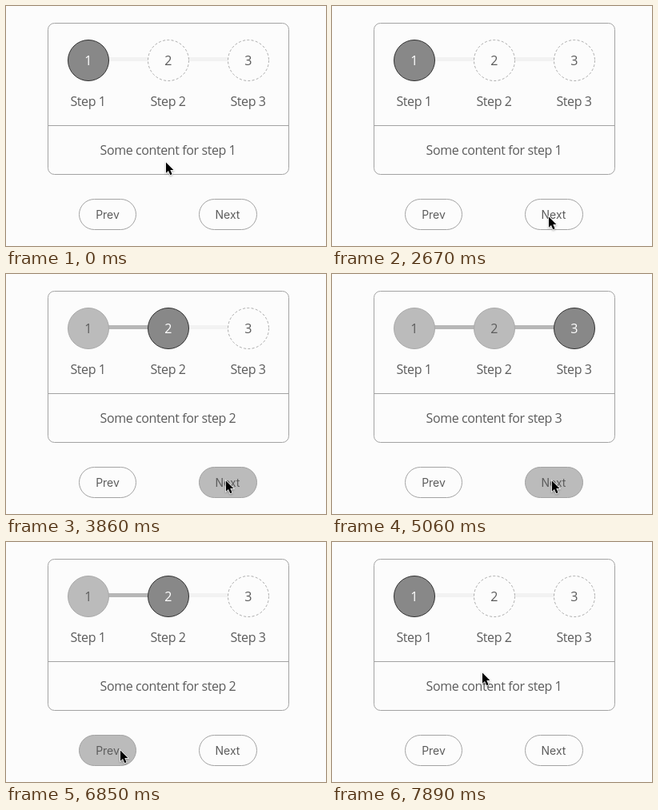
An HTML page that plays this animation: 400 px wide and 300 px high, repeating every 8 s.

```html
<!DOCTYPE html>
<html lang="en">
<head>
<meta charset="utf-8">
<title>Stepper</title>
<style>
  html, body { margin: 0; width: 100%; height: 100%; overflow: hidden; background: #fcfcfc; }
  svg { display: block; width: 400px; height: 300px; }
  text { font: 16px "Open Sans", sans-serif; letter-spacing: -.4px; fill: #5c5c5c; text-anchor: middle; }
  .frame { fill: none; stroke: #a3a3a3; }
  .line { fill: #f2f2f2; }
  .line.done { fill: #b7b7b7; }
  .step circle { fill: #fcfcfc; stroke: #aaa; stroke-dasharray: 3 2.35; }
  .step.done circle { fill: #bbb; stroke: #aaa; stroke-dasharray: none; }
  .step.active circle { fill: #888; stroke: #333; stroke-dasharray: none; }
  .step.active .number { fill: #fff; }
  .button rect { fill: #fcfcfc; stroke: #a3a3a3; }
  .button.hover rect { fill: #bbb; }
  .button text { font: 14px Inter, sans-serif; letter-spacing: 0; }
  #cursor { filter: drop-shadow(0 1px 1px rgba(0, 0, 0, .3)); }
</style>
</head>
<body>
<svg viewBox="0 0 400 300">
  <g class="frame">
    <rect x="52.5" y="21.5" width="301" height="189" rx="8"/>
    <path d="M53 149.5H353"/>
  </g>
  <g id="steps"></g>
  <text id="content" x="202.5" y="186"></text>
  <g class="button" id="prev">
    <rect x="91.5" y="241.5" width="71" height="38" rx="19"/>
    <text x="127" y="266">Prev</text>
  </g>
  <g class="button" id="next">
    <rect x="241.5" y="241.5" width="72" height="38" rx="19"/>
    <text x="277" y="266">Next</text>
  </g>
  <path id="cursor" d="M1 .5V13.7L4 10.9 6.3 16.3 8.6 15.3 6.3 10H10.4Z"
        fill="#000" stroke="#fff" stroke-width="1.4" paint-order="stroke"/>
</svg>
<script>
const DURATION = 8000;
const TICK = 148.8; // the picture advances in discrete ticks
const TICK_OFFSET = 15;

const easeIn = t => t ** 1.5;
const easeOut = t => 1 - (1 - t) ** 2;

// All times below are in ticks.
const start = [199, 195];
const moves = [
  { from: 5, to: 6, target: [252, 155] },
  { from: 7, to: 9, target: [264, 273], ease: easeIn },
  { from: 9, to: 11, target: [270, 263] },
  { from: 18, to: 19, target: [271, 281] },
  { from: 19, to: 20, target: [274, 255] },
  { from: 20, to: 22, target: [274, 258] },
  { from: 39, to: 42, target: [142, 260] },
  { from: 52, to: 53, target: [187, 163] }
];
const buttons = [
  { id: "next", enter: 21, leave: 40, clicks: [26, 34], change: 1 },
  { id: "prev", enter: 41, leave: 53, clicks: [46, 50], change: -1 }
];

const byId = id => document.getElementById(id);

function cursorAt(tick) {
  return moves.reduce((position, { from, to, target, ease = easeOut }) => {
    const progress = ease(Math.min(1, Math.max(0, (tick - from) / (to - from))));
    return position.map((p, axis) => p + (target[axis] - p) * progress);
  }, start);
}

function stepAt(tick) {
  return buttons.reduce((step, { clicks, change }) =>
    step + change * clicks.filter(click => click <= tick).length, 1);
}

byId("steps").innerHTML = [1, 2, 3].map(n => {
  const x = 3 + n * 100;
  const line = n < 3 ? `<rect class="line" x="${x + 25}" y="64" width="50" height="5"/>` : "";
  return `${line}<g class="step">
    <circle cx="${x}" cy="68" r="25.5"/>
    <text class="number" x="${x - 0.5}" y="74">${n}</text>
    <text x="${x - 0.5}" y="125">Step ${n}</text>
  </g>`;
}).join("");

const steps = document.querySelectorAll(".step");
const lines = document.querySelectorAll(".line");

function render(time) {
  const tick = Math.floor((time % DURATION + TICK_OFFSET) / TICK);
  const current = stepAt(tick);

  steps.forEach((step, i) => {
    step.classList.toggle("done", i + 1 < current);
    step.classList.toggle("active", i + 1 === current);
  });
  lines.forEach((line, i) => line.classList.toggle("done", i + 1 < current));
  buttons.forEach(({ id, enter, leave }) =>
    byId(id).classList.toggle("hover", tick >= enter && tick < leave));
  byId("content").textContent = `Some content for step ${current}`;
  byId("cursor").setAttribute("transform", `translate(${cursorAt(tick).map(Math.round)})`);
}

const origin = performance.now();
function animate() {
  render(performance.now() - origin);
  requestAnimationFrame(animate);
}
animate();
</script>
</body>
</html>
```
